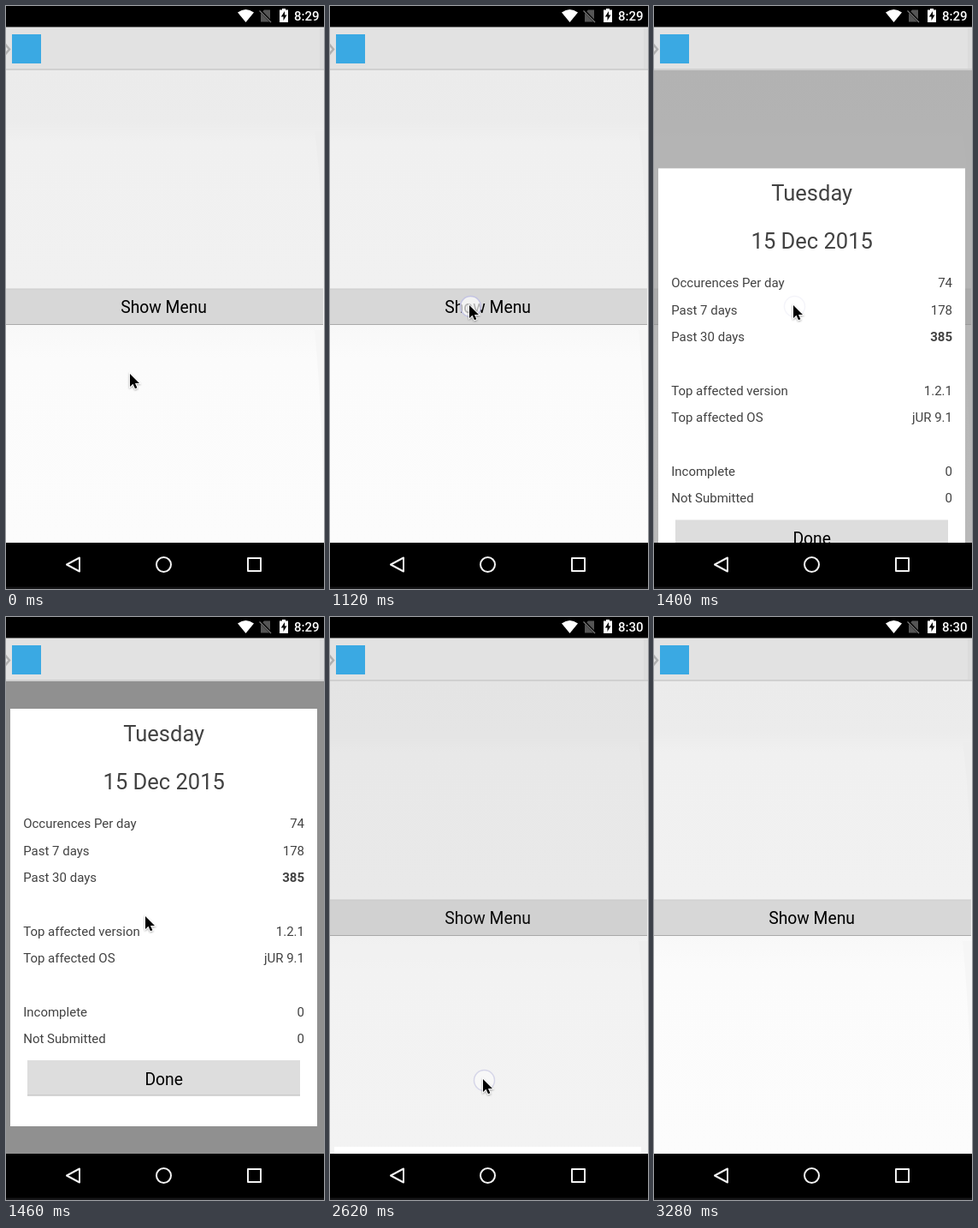
Animation of 372x680 px, one loop 3.72 s. Source, as an HTML page:

```html
<!DOCTYPE html>
<html lang="en">
<head>
<meta charset="utf-8">
<title>Popup menu</title>
<style>
  html, body { margin: 0; width: 100%; height: 100%; overflow: hidden; background: #000; }
  svg { display: block; width: 100vw; height: 100vh; font-family: Roboto, sans-serif; }
  .mid { text-anchor: middle; }
  .button { font-size: 19.3px; fill: #000; }
  .title { font-size: 25.5px; }
  #rows { font-size: 15px; }
  #panel { fill: #424242; }
</style>
</head>
<body>
<svg viewBox="0 0 372 680">
  <defs>
    <linearGradient id="back" x1="0" y1="75" x2="0" y2="626" gradientUnits="userSpaceOnUse">
      <stop offset="0" stop-color="#ebebeb"/>
      <stop offset=".11" stop-color="#ececec"/>
      <stop offset=".15" stop-color="#f0f0f0"/>
      <stop offset=".46" stop-color="#f1f1f1"/>
      <stop offset=".54" stop-color="#f8f8f8"/>
      <stop offset=".61" stop-color="#fbfbfb"/>
      <stop offset="1" stop-color="#fcfcfc"/>
    </linearGradient>
    <filter id="shade" x="-50%" y="-50%" width="200%" height="200%">
      <feDropShadow dx="0" dy="1" stdDeviation="1" flood-opacity=".4"/>
    </filter>
  </defs>

  <rect y="75" width="372" height="551" fill="url(#back)"/>
  <path d="M361 146H372V330Q369 200 361 146Z" fill="#ededed"/>
  <path d="M361 378H372V580Q369 460 361 378Z" fill="#f6f6f6"/>
  <path d="M0 330H370Q371 330 371 331V371H0Z" fill="#d7d7d7"/>
  <path d="M0 330H371" stroke="#cdcdcd"/>
  <path d="M0 371.5H371" stroke="#aaa"/>
  <text class="mid button" x="184.6" y="358">Show Menu</text>

  <rect id="dim" y="75" width="372" height="551" fill="#909090"/>
  <g id="panel">
    <rect x="5" y="107" width="359" height="487" fill="#fff"/>
    <text class="mid title" x="184.7" y="145">Tuesday</text>
    <text class="mid title" x="184.7" y="201">15 Dec 2015</text>
    <g id="rows"></g>
    <rect x="25" y="517" width="319" height="41" fill="#ddd"/>
    <path d="M25 558H344" stroke="#b8b8b8"/>
    <text class="mid button" x="184.7" y="545.5">Done</text>
  </g>

  <rect y="24" width="372" height="51" fill="#e2e2e2"/>
  <rect x="367" y="26" width="5" height="47" fill="#dcdcdc"/>
  <rect y="73" width="372" height="2" fill="#d0d0d0"/>
  <path d="M-1 56L4 50 -1 44" transform="translate(0 .5)" fill="none" stroke="#b0b0b0" stroke-width="2.5"/>
  <rect x="7" y="33" width="34" height="34" fill="#3aa9e3"/>

  <rect width="372" height="24.5"/>
  <path d="M271 7.5Q280.500 .5 290 7.500L280.500 19Z" fill="#fff"/>
  <path d="M302 4.500H309V18.500H298V8.500Z" fill="#555"/>
  <path d="M296.500 4.500L310 18.500" stroke="#000" stroke-width="3"/>
  <path d="M296.500 5.500L310 19" stroke="#777" stroke-width="1.300"/>
  <path d="M323 3H327V4.500H330V19H320V4.500H323Z" fill="#fff"/>
  <path d="M326 6L321.800 12.500H324.500V17L328.500 10.500H326Z"/>
  <text id="clock" x="366.500" y="17" font-size="15" font-weight="500" fill="#fff" text-anchor="end"></text>

  <rect y="626" width="372" height="54"/>
  <rect y="677.500" width="372" height="2.500" fill="#151517"/>
  <g fill="none" stroke="#f2f2f2" stroke-width="2" stroke-linejoin="round">
    <path d="M71 651.500L86 643.500V659.500Z"/>
    <circle cx="184.500" cy="651.500" r="8.500"/>
    <rect x="283" y="644" width="15" height="15"/>
  </g>

  <g id="pointer">
    <circle id="touch" cx="1.500" cy="1.500" r="12" fill="#fff" fill-opacity=".7" stroke="#c3c3e2" stroke-width="1.500"/>
    <path d="M0 0V15L3.500 11.800 6 17.300 8.400 16.300 6 11H11Z" stroke="#fff" stroke-width="1.600" paint-order="stroke" filter="url(#shade)"/>
  </g>
</svg>
<script>
const LOOP = 3720, HIDDEN = 519;
const $ = id => document.getElementById(id);
const clamp = x => Math.min(1, Math.max(0, x));
const ease = p => (1 - Math.cos(Math.PI * clamp(p))) / 2;

const rows = [
  [246, "Occurences Per day", "74"],
  [278, "Past 7 days", "178"],
  [309, "Past 30 days", "385", "bold"],
  [372, "Top affected version", "1.2.1"],
  [403, "Top affected OS", "jUR 9.1"],
  [466, "Incomplete", "0"],
  [497, "Not Submitted", "0"]
];
$("rows").innerHTML = rows.map(([y, label, value, weight = "normal"]) =>
  `<text x="20.2" y="${y}">${label}</text>
   <text x="349" y="${y}" text-anchor="end" font-weight="${weight}">${value}</text>`).join("");

// Pointer strokes: start time, end time, steps, start, control, end
const moves = [
  [510, 710, 5, [145, 429], [122, 385], [166, 332]],
  [890, 940, 2, [166, 332], [165, 340], [163, 349]],
  [1610, 2090, 9, [163, 349], [85, 445], [176, 542]],
  [2270, 2338, 2, [176, 542], [178, 540], [179, 539]],
  [2800, 3220, 8, [179, 539], [222, 625], [334, 654]]
];
const openTicks = [1120, 1210, 1250, 1290, 1340, 1400, 1460];
const closeTicks = Array.from({ length: 7 }, (_, i) => 2270 + i * 410 / 6);

const steps = (t, a, b, n) => clamp((Math.floor((t - a) * (n - 1) / (b - a)) + 1) / n);
const snap = (t, ticks) => ticks.reduce((last, k) => k <= t ? k : last, 0);

function pointerAt(t) {
  const [a, b, n, from, mid, to] = moves.filter(m => m[0] <= t).pop() || moves[0];
  const p = steps(t, a, b, n), q = 1 - p;
  return from.map((v, i) => q * q * v + 2 * p * q * mid[i] + p * p * to[i]);
}

function draw(t) {
  const up = snap(t, openTicks), down = snap(t, closeTicks);
  const shown = ease((up - 1230) / 230) - ease((down - 2400) / 230);
  const dim = clamp((up - 1300) / 160) - clamp((down - 2400) / 230);
  $("panel").setAttribute("transform", `translate(0 ${HIDDEN * (1 - shown)})`);
  $("dim").setAttribute("opacity", dim);

  let touch = 0;
  if (t >= 1120 && t < 1460) touch = 1 - (up - 1120) / 340;
  if (t >= 2338 && t < 2800) touch = 1 - (down - 2338) / 680;
  $("touch").setAttribute("opacity", touch);
  $("pointer").setAttribute("transform", `translate(${pointerAt(t)})`);
  $("pointer").setAttribute("visibility", t < 3280 ? "visible" : "hidden");
  $("clock").textContent = t < 2407 ? "8:29" : "8:30";
}

const start = performance.now();
function frame() {
  draw((performance.now() - start) % LOOP);
  requestAnimationFrame(frame);
}
frame();
</script>
</body>
</html>
```
